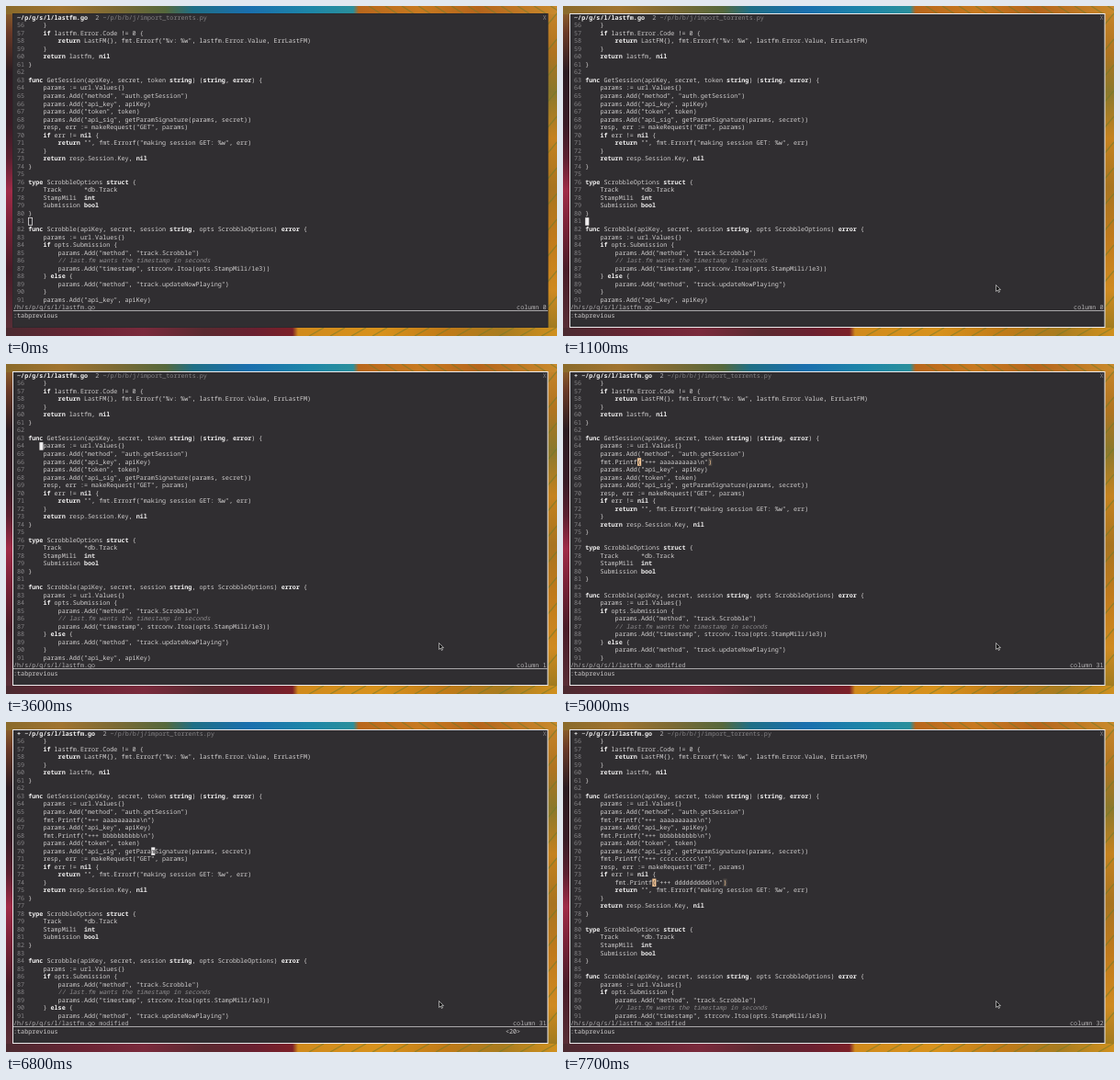
Write an HTML page that moves like this. It is 600 px wide and 359 px high and loops after 8 s.

```html
<!DOCTYPE html>
<html lang="en">
<head>
<meta charset="utf-8">
<title>Terminal editor</title>
<style>
  html, body { margin: 0; width: 100%; height: 100%; overflow: hidden; background: #302e31; }
  svg { display: block; width: 600px; height: 359px; }
  text {
    font: 6.767px "Noto Sans Mono", "DejaVu Sans Mono", monospace;
    white-space: pre; text-rendering: geometricPrecision; fill: #d2d0d0;
  }
  .b { font-weight: 700; fill: #efeeee; }
  .n { fill: #858386; }
  .c { fill: #8e8c8e; font-style: italic; }
  .s { fill: #b4b2b4; }
  .k { fill: #2b292c; }
  .m { fill: #f3c595; }
</style>
</head>
<body>
<svg viewBox="0 0 600 359" xmlns="http://www.w3.org/2000/svg">
  <defs id="defs"></defs>
  <g id="wall"></g>
  <rect id="win" x="7.5" y="8.5" width="582.5" height="341" fill="#302e31"/>
  <path d="M8 331.5H590" stroke="#aaa8aa"/>
  <g id="rows"></g>
  <g id="marks"></g>
  <path id="mouse" d="M0 0V7L1.7 5.5L2.9 8L4 7.5L2.9 5.1H5Z" fill="#111" stroke="#eee" stroke-width=".6"/>
</svg>
<script>
const LOOP = 8000, X0 = 8, CW = 4.06, Y0 = 8.4, RH = 8.53, FIRST = 56, ROWS = 36;
const $ = id => document.getElementById(id);

const CODE = `	}
	if lastfm.Error.Code != 0 {
		return LastFM{}, fmt.Errorf("%v: %w", lastfm.Error.Value, ErrLastFM)
	}
	return lastfm, nil
}

func GetSession(apiKey, secret, token string) (string, error) {
	params := url.Values{}
	params.Add("method", "auth.getSession")
	params.Add("api_key", apiKey)
	params.Add("token", token)
	params.Add("api_sig", getParamSignature(params, secret))
	resp, err := makeRequest("GET", params)
	if err != nil {
		return "", fmt.Errorf("making session GET: %w", err)
	}
	return resp.Session.Key, nil
}

type ScrobbleOptions struct {
	Track      *db.Track
	StampMili  int
	Submission bool
}

func Scrobble(apiKey, secret, session string, opts ScrobbleOptions) error {
	params := url.Values{}
	if opts.Submission {
		params.Add("method", "track.Scrobble")
		// last.fm wants the timestamp in seconds
		params.Add("timestamp", strconv.Itoa(opts.StampMili/1e3))
	} else {
		params.Add("method", "track.updateNowPlaying")
	}
	params.Add("api_key", apiKey)`.split("\n");

// Debug lines in order of insertion: line number, indent, letter
const PRINTS = [[66, 1, "a"], [68, 1, "b"], [71, 1, "c"], [74, 2, "d"]];

// time, cursor line, wanted byte index, debug lines so far, pending key
const STEPS = [
  [0, 81, 0, 0], [2300, 75, 0, 0], [2700, 62, 0, 0], [3200, 63, 0, 0],
  [3600, 64, 0, 0], [4700, 65, 0, 0], [4900, 65, 0, 0, 1], [5000, 66, 30, 1],
  [5500, 67, 30, 1], [5600, 67, 30, 1, 1], [5700, 68, 30, 2], [6100, 69, 30, 2],
  [6400, 70, 30, 2], [6800, 70, 30, 2, 1], [6900, 71, 30, 3], [7100, 72, 30, 3],
  [7300, 73, 30, 3], [7600, 73, 30, 3, 1], [7700, 74, 31, 4]
];

// time, x, y of the pointer
const POINTER = [
  [400, 597, 350], [500, 590, 355], [600, 583, 355], [800, 577.5, 351.5],
  [900, 552, 340], [1000, 498, 316], [1100, 471.5, 303.5]
];
const FOCUS = 900;

const esc = s => s.replace(/&/g, "&amp;").replace(/</g, "&lt;");
const span = (cls, s) => `<tspan class="${cls}">${esc(s)}</tspan>`;
const colX = c => X0 + c * CW;
const rowY = r => Y0 + r * RH;
const put = (row, col, html) =>
  `<text x="${colX(col).toFixed(2)}" y="${(rowY(row) + 6.3).toFixed(2)}">${html}</text>`;
const latest = (list, t) => list.filter(e => e[0] <= t).pop();

const TOKEN = /(\/\/.*)|("[^"]*")|\b(func|return|if|else|type|struct|nil|string|error|int|bool)\b/g;
function paint(line) {
  let out = "", at = 0;
  const s = line.replace(/\t/g, "    ");
  for (const m of s.matchAll(TOKEN)) {
    out += esc(s.slice(at, m.index));
    out += m[1] ? span("c", m[0]) : m[2] ? esc(m[0]) : span("b", m[0]);
    at = m.index + m[0].length;
  }
  return out + esc(s.slice(at));
}

function buffer(count) {
  const lines = CODE.slice();
  for (const [n, tabs, ch] of PRINTS.slice(0, count))
    lines.splice(n - FIRST, 0, "\t".repeat(tabs) + `fmt.Printf("+++ ${ch.repeat(10)}\\n")`);
  return lines.slice(0, ROWS);
}

// Screen column of a byte, where a tab shows its cursor on the last cell
function screenCol(line, i) {
  const tabs = line.match(/^\t*/)[0].length;
  return 4 + (i < tabs ? 4 * i + 3 : 3 * tabs + i);
}

function findPair(lines, row, i) {
  const open = lines[row][i], close = { ")": "(", "{": "}" }[open];
  if (!close) return null;
  const dir = open === "{" ? 1 : -1;
  for (let depth = 0; lines[row] !== undefined;) {
    const ch = lines[row][i];
    if (ch === open) depth++;
    if (ch === close && --depth === 0) return [row, i];
    i += dir;
    if (i < 0 || i >= lines[row].length) {
      row += dir;
      i = dir > 0 || !lines[row] ? 0 : lines[row].length - 1;
    }
  }
  return null;
}

function cell(row, col, fill, ch, cls) {
  const glyph = ch && ch !== "\t" ? put(row, col, span(cls, ch)) : "";
  return `<rect x="${colX(col)}" y="${rowY(row)}" width="${CW}" height="${RH}" fill="${fill}"/>` + glyph;
}

function drawScreen([, lineNo, want, count, key], focused) {
  const lines = buffer(count), r = lineNo - FIRST, line = lines[r];
  const i = Math.max(0, Math.min(want, line.length - 1));
  const col = screenCol(line, i), dirty = count > 0;
  const column = "column " + (line ? i + 1 : 0);
  const shift = dirty ? 2 : 0;

  $("rows").innerHTML =
    put(0, 1, span("b", (dirty ? "+ " : "") + "~/p/g/s/l/lastfm.go")) +
    put(0, 22 + shift, span("s", "2")) +
    put(0, 24 + shift, span("n", "~/p/b/b/j/import_torrents.py")) +
    put(0, 142, span("n", "X")) +
    lines.map((s, n) => put(n + 1, 1, span("n", FIRST + n + " ") + paint(s))).join("") +
    put(37, 0, span("s", "/h/s/p/g/s/l/lastfm.go" + (dirty ? " modified" : ""))) +
    put(37, 143 - column.length, span("s", column)) +
    put(38, 0, ":tabprevious") +
    (key ? put(38, 132, esc("<20>")) : "");

  if (!focused) {
    $("marks").innerHTML = `<rect x="${colX(col) + .3}" y="${rowY(r + 1) + .4}" width="${CW}"
      height="${RH - .8}" fill="none" stroke="#dedcde" stroke-width=".8"/>`;
    return;
  }
  const pair = line ? findPair(lines, r, i) : null;
  $("marks").innerHTML = pair
    ? cell(r + 1, col, "#4b4643", line[i], "m") +
      cell(pair[0] + 1, screenCol(lines[pair[0]], pair[1]), "#f3c595", lines[pair[0]][pair[1]], "k")
    : cell(r + 1, col, "#efedee", line[i], "k");
}

// Leaves around the window: x, y, width, height, vertical, colour:percent stops
const STRIPS = [
  [0, 0, 9, 359, 1, "#96692a:0 #6a3a28:8 #2c1c22:20 #3a1c26:36 #5c2030:46 #a02c48:56 #7c2238:66 #4a1c28:80 #5a3038:100"],
  [590, 0, 10, 359, 1, "#c8862a:0 #b07420:14 #8a782c:26 #c5821f:40 #a87420:55 #c07a1c:70 #cf8a20:86 #97781f:100"],
  [0, 0, 600, 9, 0, "#8a6a2a:0 #a07430:10 #7c6a34:20 #55683c:29 #1f6f86:34 #1a6fae:44 #1d86a8:55 #2a8f9c:63 #b8661c:64 #c87a20:75 #b5651c:86 #c98a2c:100"],
  [0, 350, 600, 9, 0, "#4a2a30:0 #6a2434:14 #7a2a3c:25 #5a2a30:36 #6a2030:45 #7c2028:52 #d08a1c:53 #d8921c:68 #c07a18:80 #a87c20:90 #d0901e:100"]
];

function drawWall() {
  STRIPS.forEach(([x, y, w, h, down, colors], n) => {
    const stops = colors.split(" ").map(s => s.split(":"))
      .map(([c, at]) => `<stop offset="${at}%" stop-color="${c}"/>`).join("");
    $("defs").innerHTML += `<linearGradient id="g${n}" x2="${1 - down}" y2="${down}">${stops}</linearGradient>`;
    $("wall").innerHTML += `<rect x="${x}" y="${y}" width="${w}" height="${h}" fill="url(#g${n})"/>`;
  });
  // Veins of the golden leaf on the right
  let veins = "";
  for (let k = 0; k < 12; k++) {
    veins += `M${395 + k * 18} 0l14 9M${330 + k * 23} 359l16 -9M590 ${20 + k * 28}l10 -12`;
  }
  $("wall").innerHTML += `<path d="${veins}" fill="none" stroke="#6f7a2c" stroke-opacity=".55" stroke-width="1.4"/>`;
}

let shown = "";
function render(t) {
  const step = latest(STEPS, t), spot = latest(POINTER, t), focused = t >= FOCUS;
  const id = step[0] + "/" + focused;
  if (id !== shown) {
    shown = id;
    drawScreen(step, focused);
    $("win").setAttribute("stroke", focused ? "#eceaeb" : "#2b292c");
  }
  $("mouse").setAttribute("visibility", spot ? "visible" : "hidden");
  if (spot) $("mouse").setAttribute("transform", `translate(${spot[1]} ${spot[2]})`);
}

drawWall();
const start = performance.now();
function tick() {
  render((performance.now() - start) % LOOP);
  requestAnimationFrame(tick);
}
tick();
</script>
</body>
</html>
```
